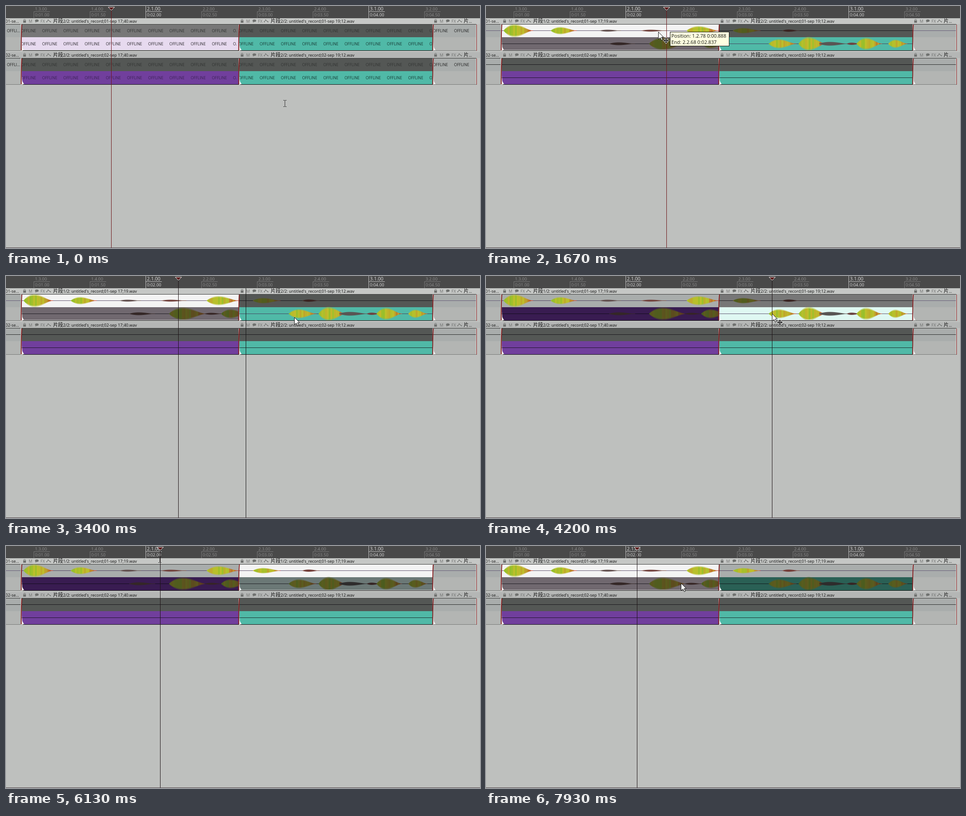
An HTML page with a canvas for the animation above (8 s loop, 1046 px wide and 535 px high).

```html
<!DOCTYPE html>
<html lang="zh">
<head>
<meta charset="utf-8">
<title>Timeline</title>
<style>
html, body { margin: 0; width: 100%; height: 100%; overflow: hidden; background: #bec0be; }
canvas { display: block; }
</style>
</head>
<body>
<canvas id="stage" width="1046" height="535"></canvas>
<script>
const ctx = document.getElementById('stage').getContext('2d');
const LOOP = 8000;
const SANS = '"Open Sans", "Noto Sans", sans-serif';
const CJK = '"Noto Sans CJK SC", "Noto Sans CJK", "Noto Sans CJK JP", sans-serif';
const ROWS = [41, 116];
const CLIPS = [{ x: 34, end: 514 }, { x: 514, end: 942 }];

// moments of the interaction
const ONLINE = 935, PICK_A = 1665, RELEASE = 1865, PICK_B = 4195, SWAP_B = 4600, PICK_C = 6395;
const PLAYS = [{ from: 2795, to: 3500, x: 380 }, { from: 6594, to: 7700, x: 333 }];
const SPEED = 0.2463;

// where each click leaves the edit cursor
const EDITS = [[0, 232], [595, 398], [RELEASE, 380], [PICK_B, 631], [5795, 340], [PICK_C, 333]];

// pointer stops: arrival time, x, y
const STOPS = [
  [0, 615, 215], [730, 399, 156], [1530, 380, 57], [1870, 380, 57], [2800, 632, 113],
  [3530, 637, 88], [4000, 631, 83], [4200, 631, 83], [4660, 631, 56], [5000, 507, 78],
  [5270, 402, 39], [5530, 361, 20], [5930, 341, 20], [6400, 333, 56], [7000, 443, 97],
  [7730, 464, 82], [7930, 430, 82]
];
const REST = 70;

// wave bursts of each clip and lane: start, end, half height
const WAVES = [
  [[[39, 104, 14], [143, 200, 8], [251, 298, 2], [343, 398, 2], [443, 514, 10]],
   [[272, 329, 3], [360, 442, 14], [438, 478, 2], [475, 530, 10]]],
  [[[545, 606, 6], [654, 692, 2.4]],
   [[624, 685, 10], [690, 750, 15], [735, 800, 4], [796, 826, 2.5], [818, 874, 13], [888, 930, 9]]]
];

const clamp = v => Math.min(1, Math.max(0, v));
const hash = n => { const v = Math.sin(n * 12.9898) * 43758.5453; return v - Math.floor(v); };

function rect(x, y, w, h, color) {
  ctx.fillStyle = color;
  ctx.fillRect(x, y, w, h);
}

function text(str, x, y, size, color, family = SANS) {
  ctx.font = size + 'px ' + family;
  ctx.fillStyle = color;
  ctx.fillText(str, x, y);
}

function poly(points, fill, stroke) {
  ctx.beginPath();
  points.forEach(([x, y]) => ctx.lineTo(x, y));
  ctx.closePath();
  if (fill) { ctx.fillStyle = fill; ctx.fill(); }
  if (stroke) { ctx.strokeStyle = stroke; ctx.lineWidth = 1; ctx.stroke(); }
}

function ruler() {
  rect(0, 0, 1046, 27, '#494949');
  for (let beat = 2; beat < 10; beat++) {
    const x = Math.round(61.4 + (beat - 2) * 123.15);
    const main = beat % 4 === 0;
    const tone = main ? '#dedede' : '#8e8e8e', line = main ? '#c4c4c4' : '#777';
    rect(x, main ? 0 : 12, 1, main ? 27 : 15, line);
    rect(x, 12, 36, 1, line);
    text(`${1 + Math.floor(beat / 4)}.${beat % 4 + 1}.00`, x + 3, 10, main ? 10.6 : 9.3, tone);
    text(`0:0${Math.floor(beat / 2)}.${beat % 2 ? '50' : '00'}`, x + 3, 23, 9.3, tone);
  }
}

function icons(x, y) {
  const c = '#707270';
  rect(x + 4, y - 1, 6, 5, c);
  ctx.strokeStyle = c;
  ctx.lineWidth = 1.1;
  ctx.beginPath();
  ctx.arc(x + 7, y - 1.5, 2, Math.PI, 0);
  ctx.stroke();
  text('M', x + 16, y + 3.5, 9, c);
  ctx.beginPath();
  ctx.ellipse(x + 34, y - .5, 4, 2.8, 0, 0, 7);
  ctx.fill();
  poly([[x + 31, y + 1], [x + 34, y + 1], [x + 31, y + 4]], c);
  text('FX', x + 42, y + 3.5, 9, c);
  const nodes = [[x + 56, y + 2], [x + 59, y - 2], [x + 64, y + 2]];
  ctx.beginPath();
  nodes.forEach(([nx, ny]) => ctx.lineTo(nx, ny));
  ctx.stroke();
  nodes.forEach(([nx, ny]) => rect(nx - 1, ny - 1, 2, 2, c));
}

function title(x, y, take, name) {
  icons(x, y);
  text('片段', x + 70, y + 4, 11, '#0c0c0c', CJK);
  text(`${take}/2: untitled's_record;${name}.wav`, x + 92, y + 3.5, 9, '#0c0c0c');
}

function offline(x, end, y, color) {
  ctx.save();
  ctx.beginPath();
  ctx.rect(x + 1, y - 10, end - x - 3, 20);
  ctx.clip();
  for (let p = x - 1; p < end; p += 46.8)
    text(end - p < 30 ? 'O.' : 'OFFLINE', p, y + 3, 8.5, color);
  ctx.restore();
}

// loud bursts run from olive to orange, quiet ones stay greyish
function wave(bursts, y, end, dim) {
  for (const [from, to, height] of bursts) {
    const loud = height > 4;
    const sat = loud ? 63 : 36 * hash(from);
    for (let x = from; x < Math.min(to, end - 1); x++) {
      const u = (x - from + .5) / (to - from), peak = .36;
      const swell = u < peak ? Math.sin(u / peak * Math.PI / 2) ** .75
                             : Math.cos((u - peak) / (1 - peak) * Math.PI / 2) ** 1.6;
      const comb = loud && x % 2 ? .8 : 1;
      const half = Math.max(.5, height * swell * comb);
      const hue = loud ? 64 - 60 * u ** 4 + (hash(x >> 2) - .5) * 26 : 5;
      const light = (loud ? 46 : 34) * (dim ? .52 : 1);
      rect(x, y - half, 1, half * 2, `hsl(${hue},${dim ? sat * .8 : sat}%,${light}%)`);
    }
  }
}

function laneColors(i, selected, active) {
  if (active === 2)
    return selected ? ['#777777', i ? '#dff8f2' : '#e7daef'] : ['#545755', i ? '#50b9a7' : '#713f9d'];
  return selected ? ['#f3f3f3', i ? '#6b7876' : '#70686f'] : ['#a9adac', i ? '#2a6055' : '#391c51'];
}

function edge(x, y, pale) {
  poly([[x + 1, y + 38], [x + 2, y + 50], [x + 6, y + 57], [x + 1, y + 57]], pale);
  ctx.strokeStyle = '#85191b';
  ctx.lineWidth = 1.8;
  ctx.beginPath();
  ctx.moveTo(x + 1, y);
  ctx.quadraticCurveTo(x - .5, y + 20, x - .5, y + 57);
  ctx.stroke();
}

function sideClip(x, end, y, online) {
  rect(x, y, end - x, 28, '#a9adac');
  rect(x, y + 28, end - x, 29, '#b3b5b3');
  rect(x, y - 1, end - x, 1, '#3a3b3a');
  rect(x, y + 57, end - x, 1, '#777977');
  if (online) rect(x, y + 13, end - x, 1, y < 100 ? '#665c78' : '#292b2a');
  else if (x) offline(x, end, y + 14, '#222');
  else text('OFFLI...', 2, y + 17, 8.5, '#222');
}

function lane(row, i, n, state, online, y) {
  const { x, end } = CLIPS[i];
  const [selected, active] = state;
  const dim = active !== n + 1;
  const mid = y + 13 + n * 29;
  rect(x + 1, y + n * 28, end - x - 2, 28 + n, laneColors(i, selected, active)[n]);
  if (!online) {
    const lit = i ? '#173a34' : selected ? '#2c292e' : '#3c2456';
    offline(x, end, mid + 1, dim ? '#323433' : lit);
    return;
  }
  rect(x, mid, end - x, 1, row || dim ? 'rgba(12,10,16,.8)' : 'rgba(64,46,82,.8)');
  if (!row) wave(WAVES[i][n], mid + .5, end, dim);
}

function tracks(t) {
  const online = t >= ONLINE;
  const idle = [false, 2];
  const top = [
    t < PICK_A ? [true, 2] : [t < PICK_B || t >= PICK_C, 1],
    [t >= PICK_B && t < PICK_C, t < SWAP_B ? 2 : 1]
  ];
  ROWS.forEach((y, row) => {
    const track = `0${row + 1}-sep`;
    rect(0, y - 14, 1046, 13, row ? '#b4b6b5' : '#c5c7c5');
    sideClip(0, 32, y, online);
    sideClip(943, 1038, y, online);
    CLIPS.forEach(({ x, end }, i) => {
      const state = row ? idle : top[i];
      rect(x, y - 1, end - x, 1, '#3a3b3a');
      lane(row, i, 0, state, online, y);
      lane(row, i, 1, state, online, y);
      rect(x + 3, y + 57, end - x - 3, 1, '#111');
      if (state[0]) rect(x + 3, y + 56, end - x - 4, 1, '#d9d9d9');
      title(x, y - 8, state[1], state[1] === 1 ? '01-sep 17;19' : `${track} ${i ? '19;12' : '17;40'}`);
    });
    text(`0${row + 1}-se...`, -1, y - 4.5, 9, '#151515');
    icons(941, y - 8);
    text('片', 1010, y - 4, 11, '#0c0c0c', CJK);
    text('...', 1021, y - 4.5, 9, '#0c0c0c');
    [34, 514, 942].forEach(x => edge(x, y, '#f1f1f2'));
    rect(1037, y, 1, 57, '#d8dad8');
    rect(1038, y, 1, 58, '#8a1719');
  });
}

function editCursor(t) {
  const x = EDITS.filter(e => e[0] <= t).pop()[1];
  rect(x, 10, 1, 524, t < RELEASE ? '#6e1418' : '#1d1315');
  poly([[x - 6.5, 2.5], [x + 7.5, 2.5], [x + .5, 9.5]], '#5b1a1a', '#e4e4e4');
}

function playCursor(t) {
  for (const { from, to, x } of PLAYS)
    if (t >= from && t < to) rect(Math.round(x + (t - from) * SPEED), 27, 1, 507, '#141414');
}

// rests briefly at each stop, then eases to the next
function pointerAt(t) {
  const next = STOPS.findIndex(s => s[0] > t);
  if (next < 0) return STOPS[STOPS.length - 1].slice(1);
  const [t0, ...a] = STOPS[next - 1], [t1, ...b] = STOPS[next];
  const u = clamp((t - t0 - REST) / (t1 - t0 - REST));
  const eased = u * u * (3 - 2 * u);
  return a.map((v, k) => Math.round(v + (b[k] - v) * eased));
}

function arrow(x, y) {
  const shape = [[0, 0], [0, 16], [4, 12.5], [7, 18.5], [9.5, 17.5], [6.7, 11.5], [11.5, 11.5]];
  poly(shape.map(([dx, dy]) => [x + dx + .5, y + dy + .5]), '#fff', '#111');
}

function iBeam(x, y) {
  rect(x, y - 6, 1, 13, '#333');
  for (const dy of [-7, 7]) {
    rect(x - 3, y + dy, 3, 1, '#333');
    rect(x + 1, y + dy, 3, 1, '#333');
  }
}

function moveMark(x, y) {
  const cross = (grow, color) => {
    for (let k = 0; k < 4; k++) {
      ctx.save();
      ctx.translate(x + .5, y + .5);
      ctx.rotate(k * Math.PI / 2);
      rect(-.8 - grow, -4, 1.6 + grow * 2, 5, color);
      poly([[0, -6 - grow * 1.3], [3 + grow, -3 + grow * .6], [-3 - grow, -3 + grow * .6]], color);
      ctx.restore();
    }
  };
  cross(1, '#fff');
  cross(0, '#111');
}

function tooltip() {
  rect(406, 57, 131, 32, '#111');
  rect(407, 58, 129, 30, '#ffffe1');
  text('Position: 1.2.78 0:00.888', 409, 69.5, 10.7, '#111');
  text('End: 2.2.68 0:02.837', 409, 84, 10.7, '#111');
}

function pointer(t) {
  const [x, y] = pointerAt(t);
  const drag = t >= PICK_A && t < RELEASE;
  const held = drag || (t >= 3665 && t < PICK_B + REST);
  if (drag) tooltip();
  const overClip = ROWS.some(top => y >= top && y < top + 58);
  if (overClip) arrow(x, y); else iBeam(x, y);
  if (held) moveMark(x + 17, y + 19);
}

function draw(t) {
  rect(0, 0, 1046, 535, '#bec0be');
  ruler();
  tracks(t);
  rect(0, 534, 1046, 1, '#4b3f45');
  editCursor(t);
  playCursor(t);
  pointer(t);
}

// the picture refreshes fifteen times a second
const FRAME = 200 / 3;
const start = performance.now();
function tick() {
  const t = (performance.now() - start) % LOOP;
  draw(Math.floor((t + 5) / FRAME) * FRAME % LOOP);
  requestAnimationFrame(tick);
}
tick();
</script>
</body>
</html>
```
